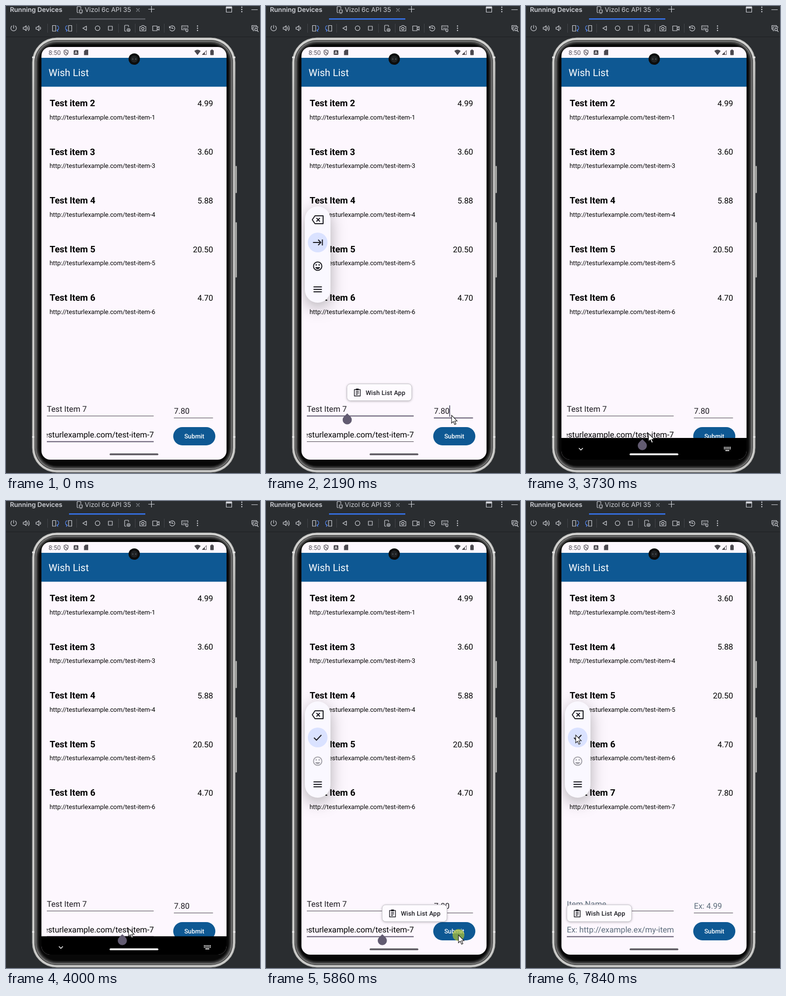
An HTML page that plays this animation: 516x946 px, repeating every 8 s.

```html
<!DOCTYPE html>
<html lang="en">
<head>
<meta charset="utf-8">
<title>Wish List</title>
<style>
  html, body { margin: 0; width: 100%; height: 100%; overflow: hidden; background: #2a2d30; }
  svg#stage { display: block; width: 100vw; height: 100vh; }
  text { font-family: Roboto, "Open Sans", sans-serif; fill: #000; text-rendering: geometricPrecision; white-space: pre; }
  .ide { font-family: Inter, Roboto, sans-serif; font-size: 13.15px; fill: #ced0d6; }
  .name { font-size: 18.3px; font-weight: 700; }
  .price { font-size: 16.3px; text-anchor: end; }
  .link { font-size: 12.8px; }
  .input { font-size: 16.3px; fill: #1d1b20; }
  .hint { font-size: 16.3px; fill: #5c6c7b; }
  .label { font-size: 12.8px; font-weight: 500; }
  .line { fill: none; stroke: #ced0d6; stroke-width: 1.2; stroke-linecap: round; stroke-linejoin: round; }
  .dark { fill: none; stroke: #1b1b21; stroke-width: 2; stroke-linejoin: round; }
  #keys { filter: drop-shadow(0 9px 16px rgba(0, 0, 0, .3)); }
  #chip { filter: drop-shadow(0 1px 2px rgba(0, 0, 0, .25)); }
</style>
</head>
<body>
<svg id="stage" viewBox="0 0 516 946" preserveAspectRatio="none">
  <defs>
    <linearGradient id="metal" x1="0" y1="0" x2="0" y2="1">
      <stop offset="0" stop-color="#d4d4d2"/>
      <stop offset=".12" stop-color="#bdbdbb"/>
      <stop offset=".6" stop-color="#c6c6c4"/>
      <stop offset="1" stop-color="#cacac8"/>
    </linearGradient>
    <clipPath id="screen"><rect x="72" y="83" width="376" height="836" rx="18"/></clipPath>
    <clipPath id="listBox"><rect x="72" y="176" width="376" height="466"/></clipPath>
    <clipPath id="urlBox"><rect x="83" y="850" width="217.500" height="32"/></clipPath>
  </defs>

  <rect width="516" height="946" fill="#2a2d30"/>
  <rect y="62" width="516" height="1" fill="#1e1f22"/>

  <!-- tool window header -->
  <text class="ide" x="8" y="12" font-weight="600">Running Devices</text>
  <text class="ide" x="160" y="12">Vizol 6c API 35</text>
  <rect id="tab" x="128" y="25" width="155" height="2.600"/>
  <g class="line">
    <path d="M152 6V2.500Q152 1 150.500 1H146Q144.500 1 144.500 2.500V12Q144.500 13.500 146 13.500H147M149 8H155V13H149ZM150 15H154"/>
    <path d="M265 5L271 11M271 5L265 11" stroke="#868a91"/>
    <path d="M289.500 6.500H301.500M295.500 .5V12.500M499 7.500H511"/>
    <rect x="447.500" y="1.500" width="11" height="11"/><path d="M448 3.500H458" stroke-width="3"/>
  </g>
  <g id="dots" fill="#ced0d6"></g>

  <!-- device toolbar -->
  <path d="M84.500 36V54M143.500 36V54M228.500 36V54M262.500 36V54M321.500 36V54" stroke="#43454a"/>
  <g class="line">
    <path d="M15.500 39V45M12 40.500A5.600 5.600 0 1 0 19 40.500"/>
    <path d="M35 43H37.500L41 40V50L37.500 47H35ZM43.500 42.500Q45.500 45 43.500 47.500M45.500 40Q49.500 45 45.500 50"/>
    <path d="M61 43H63.500L67 40V50L63.500 47H61ZM69.500 42.500Q71.500 45 69.500 47.500"/>
    <path d="M94.500 39.500H101V51H94.500Z"/>
    <path d="M103.500 40Q107.500 40.500 107 45Q107 48.500 103.500 49.500M105.500 47.500L103.500 49.500L105.500 51.500" stroke="#548af7"/>
    <path d="M127 39.500H133.500V51H127Z"/>
    <path d="M124.500 40Q120.500 40.500 121 45Q121 48.500 124.500 49.500M122.500 47.500L124.500 49.500L122.500 51.500" stroke="#548af7"/>
    <path d="M156 45L163.500 40.800V49.200Z"/>
    <circle cx="186" cy="45" r="4.700"/>
    <rect x="208" y="41" width="8" height="8"/>
    <path d="M249 42V40Q249 39 248 39H242Q241 39 241 40V50Q241 51 242 51H244"/>
    <circle cx="249" cy="48.500" r="3"/><circle cx="249" cy="48.500" r=".7"/>
    <path d="M272 41.500H275L276.500 39.500H280L281.500 41.500H284V50.500H272Z"/><circle cx="278" cy="45.800" r="2.500"/>
    <path d="M298 40.500H307V50H298ZM307 44L311 41.500V49L307 46.500"/>
    <path d="M332 41V44.500H335.500M332.500 44A5.300 5.300 0 1 1 333 48M337.500 42.500V45.500H340"/>
    <path d="M366 48H357V40H369.500V44M359.500 42.500H360M362.500 42.500H363M365.500 42.500H366M360 45.500H365"/>
    <rect x="365.500" y="46" width="4" height="6" rx="2"/>
    <path d="M502 47H499.500V39.500H509V42M504 50H502V42H511.500V44"/><circle cx="508" cy="47.500" r="2.700"/><path d="M510 49.500L512.500 52"/>
  </g>

  <!-- phone body -->
  <g fill="#c2c2be" stroke="#55585a" stroke-width=".7">
    <rect x="464" y="324" width="5" height="55" rx="1"/>
    <rect x="464" y="438" width="5" height="112" rx="1"/>
  </g>
  <rect x="53" y="64" width="413" height="881" rx="50" fill="url(#metal)" stroke="#5c5e5e" stroke-width="1"/>
  <path d="M53 104H59M460 104H466M53 873H59M460 873H466" stroke="#e6e6e6" stroke-width="3"/>
  <g id="bezel"></g>

  <g clip-path="url(#screen)">
    <rect x="72" y="83" width="376" height="836" fill="#fdf7fe"/>
    <g id="list" clip-path="url(#listBox)"><g id="rows"></g></g>
    <rect x="72" y="105" width="376" height="58.500" fill="#0e5893"/>
    <text x="86.500" y="142.400" font-size="20.100" style="fill:#fff">Wish List</text>

    <!-- status bar -->
    <text x="86.500" y="98.500" font-size="12.800" style="fill:#55525a">8:50</text>
    <g fill="#4b484f">
      <path d="M122 89L126 90.500V94Q126 97.500 122 99.500Q118 97.500 118 94V90.500Z" fill="none" stroke="#4b484f" stroke-width="1.300"/>
      <path d="M120 92L124.500 97" stroke="#4b484f" stroke-width="1.200"/>
      <rect x="137.500" y="89.500" width="9.500" height="9.500" rx="1.500"/>
      <path d="M140 97L142.200 91.500L144.500 97M141 95.300H143.500" stroke="#fff" fill="none"/>
      <path d="M161.500 88.500H167V99.500H158.500V91.500Z"/>
      <path d="M382.500 91Q389 86 395.500 91L389 99.500Z"/>
      <path d="M398.500 99V98L407.500 89.500V99ZM404 93.500V98H406.500V91.500Z" fill-rule="evenodd"/>
      <rect x="415" y="89.500" width="7" height="10" rx="1"/><rect x="417" y="88.300" width="3" height="2"/>
    </g>
    <circle cx="260.500" cy="107.500" r="11.500" fill="#0c0c0c"/>
    <circle cx="260.500" cy="107.500" r="7" fill="#202224"/>
    <path d="M256.500 107.500H258.500M262.500 107.500H264.500" stroke="#59606a" stroke-width="2"/>

    <!-- form -->
    <g id="filled">
      <text class="input" x="83" y="821.800">Test Item 7</text>
      <text class="input" x="341.200" y="826.300">7.80</text>
      <g clip-path="url(#urlBox)"><text class="input" x="300.300" y="874" text-anchor="end" style="fill:#000">http://testurlexample.com/test-item-7</text></g>
    </g>
    <g id="empty">
      <text class="hint" x="83" y="821.800">Item Name</text>
      <text class="hint" x="341.200" y="826.300">Ex: 4.99</text>
      <g clip-path="url(#urlBox)"><text class="hint" x="83" y="874">Ex: http://example.ex/my-item</text></g>
    </g>
    <path id="nameLine" d="M83 830.500H300"/>
    <path id="priceLine" d="M341 834.500H420.500"/>
    <path id="urlLine" d="M83 882.500H300"/>
    <rect id="button" x="339.700" y="853" width="85.600" height="37" rx="18.500"/>
    <text class="label" x="382.500" y="876.300" text-anchor="middle" style="fill:#fff">Submit</text>
    <rect id="caret" width="1.500" height="23" fill="#42405a"/>

    <!-- collapsed keyboard bar -->
    <g id="bar">
      <rect x="72" y="875" width="376" height="80"/>
      <path d="M107.500 895.500L111.500 899.500L115.500 895.500" fill="none" stroke="#fff" stroke-width="1.500"/>
      <path d="M402 894H416M402 897H416" stroke="#eee" stroke-width="1.800" stroke-dasharray="2 1"/>
      <path d="M405 900.500H413" stroke="#eee" stroke-width="1.800"/>
    </g>
    <rect id="pill" x="210.500" y="906.300" width="99" height="3.800" rx="1.900"/>
    <path id="drop" d="M0 -13L6.600 -6.600A9.300 9.300 0 1 1 -6.600 -6.600Z" fill="#625b71"/>

    <!-- clipboard chip -->
    <g id="chip">
      <rect x=".5" y=".5" width="131.500" height="34" rx="7" fill="#fefbff" stroke="#c6c4ca"/>
      <path class="dark" style="stroke-width:1.400" d="M15.500 12H27.500V25H15.500ZM18.500 16H24.500M18.500 19H24.500M18.500 22H22.500"/>
      <rect x="18.500" y="10" width="6" height="3.500" rx="1" fill="#1b1b21"/>
      <text class="label" x="38.400" y="22.500" letter-spacing=".18" style="fill:#1b1b21">Wish List App</text>
    </g>

    <!-- floating key strip, centred on its own middle -->
    <g id="keys">
      <rect x="-26" y="-97.500" width="52" height="195" rx="26" fill="#faf8ff"/>
      <circle cy="-24.500" r="20" fill="#dae2ff"/>
      <path class="dark" d="M-11 -70.500L-5.500 -78.500H11V-62.500H-5.500ZM-2.500 -74L4.500 -67M4.500 -74L-2.500 -67"/>
      <path id="next" class="dark" d="M-9.500 -24.500H6M1 -30L6.500 -24.500L1 -19M9.500 -30.500V-18.500"/>
      <path id="check" class="dark" d="M-7.500 -24L-2.500 -19L7.500 -29.500"/>
      <g id="face">
        <circle class="dark" cy="23.500" r="8.500"/>
        <circle cx="-3" cy="21" r="1.400" fill="#1b1b21"/><circle cx="3" cy="21" r="1.400" fill="#1b1b21"/>
        <path d="M-5 25.500H5Q3.500 29.500 0 29.500T-5 25.500Z" fill="#1b1b21"/>
      </g>
      <path class="dark" d="M-8.500 65.500H8.500M-8.500 70.500H8.500M-8.500 75.500H8.500"/>
    </g>
  </g>

  <g id="mouse">
    <circle id="press" r="12" fill="#bccb2c" fill-opacity=".65"/>
    <path d="M0 0V16L3.700 12.700L6.300 18.800L9 17.700L6.400 11.700H11.300Z" fill="#fff" stroke="#111" stroke-width="1.100"/>
  </g>
</svg>

<script>
const LOOP = 8000, PITCH = 98.6;
const el = id => document.getElementById(id);
const ui = {};
document.querySelectorAll('[id]').forEach(n => ui[n.id] = n);

el('dots').innerHTML = [[479, 7], [389, 45]].map(([x, y]) =>
  [-4.5, 0, 4.5].map(d => `<circle cx="${x}" cy="${y + d}" r="1.25"/>`).join('')).join('');

// glossy rim: a dark seam, then nested outlines fading from grey to black
const inset = (d, shade) => `<rect x="${53 + d}" y="${64 + d}" width="${413 - 2 * d}"
  height="${881 - 2 * d}" rx="${50 - d}" fill="rgb(${shade},${shade},${shade})"/>`;
let rim = inset(5, 28);
for (let i = 0; i <= 12; i++) rim += inset(6 + i * .75, Math.round(8 + 122 * (1 - i / 12) ** 1.5));
el('bezel').innerHTML = rim;

const items = [
  ['item 2', '4.99', 1], ['item 3', '3.60', 3], ['Item 4', '5.88', 4],
  ['Item 5', '20.50', 5], ['Item 6', '4.70', 6], ['Item 7', '7.80', 7]
];
el('rows').innerHTML = items.map(([name, price, n], i) => `<g transform="translate(0 ${i * PITCH})">
  <text class="name" x="88.700" y="203">Test ${name}</text>
  <text class="price" x="420.700" y="202.800">${price}</text>
  <text class="link" x="88.500" y="229.600">http://testurlexample.com/test-item-${n}</text></g>`).join('');

// pointer path: time, x, y
const path = [
  [290, 444, 890], [620, 335, 858], [1030, 214, 808], [1100, 214, 808], [1240, 206, 815],
  [1380, 206, 815], [1850, 347, 821], [1920, 347, 821], [2080, 377, 829], [2850, 377, 829],
  [3260, 335, 850], [3400, 335, 850], [3570, 249, 866], [4270, 249, 866], [4490, 166, 883],
  [4790, 339, 884], [5010, 339, 884], [5730, 391, 879], [6680, 391, 879], [7420, 166, 530],
  [7500, 166, 530], [7800, 101, 474]
];
const presses = [[1230, 1350], [2080, 2180], [3580, 3700], [5860, 6000]];

const within = (t, a, b) => t >= a && t < b;
const ramp = (t, a, b) => Math.min(1, Math.max(0, (t - a) / (b - a)));
const ease = (t, a, b) => { const p = ramp(t, a, b); return p * p * (3 - 2 * p); };
const show = (n, on) => n.style.display = on ? '' : 'none';
const move = (n, x, y, s = 1) => n.setAttribute('transform', `translate(${x} ${y}) scale(${s})`);
const blink = (t, start) => (t - start) % 1000 < 500;

function pointerAt(t) {
  let i = 0;
  while (i < path.length - 2 && t >= path[i + 1][0]) i++;
  const [a, x, y] = path[i], [b, u, v] = path[i + 1], p = ease(t, a, b);
  return [x + (u - x) * p, y + (v - y) * p];
}

function underline(n, on) {
  n.setAttribute('stroke', on ? '#625b71' : '#4b474e');
  n.setAttribute('stroke-width', on ? 2 : 1);
}

function caretAt(t) {
  if (within(t, 1250, 2110)) return blink(t, 1250) && [164.5, 804];
  if (within(t, 2110, 3590)) return blink(t, 2110) && [372.5, 809];
  if (within(t, 4200, 6080)) return blink(t, 4200) && [235.7, 856];
  return t >= 6080 && blink(t, 6010) && [83, 856];
}

function draw(t) {
  ui.tab.setAttribute('fill', t < 1200 ? '#5a5d63' : '#3574f0');

  const done = t >= 6080;
  show(ui.filled, !done);
  show(ui.empty, done);
  move(ui.rows, 0, -PITCH * ease(t, 6060, 6240));
  underline(ui.nameLine, within(t, 1250, 2230));
  underline(ui.priceLine, within(t, 2110, 3600));
  underline(ui.urlLine, t < 1250 || t >= 3600);

  const lit = ramp(t, 5920, 6050) * (1 - ramp(t, 6560, 6800));
  ui.button.setAttribute('fill', `rgb(${14 + 13 * lit},${88 + 8 * lit},${147 + 7 * lit})`);

  const caret = caretAt(t);
  show(ui.caret, caret);
  if (caret) move(ui.caret, ...caret);

  const rise = ease(t, 2850, 3080) * (1 - ease(t, 3960, 4130));
  move(ui.bar, 0, 46 * (1 - rise));
  show(ui.bar, rise > 0);
  ui.pill.setAttribute('fill', rise > .5 ? '#fff' : '#625f65');

  const first = within(t, 1250, 2230);
  show(ui.drop, first || within(t, 3600, 6080));
  move(ui.drop, ...(first ? [165, 838.3] : [236.3, 890.5]));

  const chip = within(t, 1930, 2230) ? [164, 765] : within(t, 4150, 6080) ? [235.5, 817.5] : t >= 6150 && [82.5, 817.5];
  show(ui.chip, chip);
  if (chip) move(ui.chip, ...chip);

  const second = t >= 4150, open = second ? 4150 : 1930;
  const alpha = ramp(t, open, open + 130) * (second ? 1 : 1 - ramp(t, 2780, 2880));
  show(ui.keys, alpha > 0);
  ui.keys.style.opacity = alpha;
  move(ui.keys, second ? 112 - 7 * ease(t, 4480, 4720) : 105, 503.5, .85 + .15 * ease(t, open, open + 220));
  show(ui.next, !second);
  show(ui.check, second);
  ui.face.style.opacity = second ? .38 : 1;

  show(ui.mouse, t >= 290);
  move(ui.mouse, ...pointerAt(t));
  show(ui.press, presses.some(([a, b]) => within(t, a, b)));
}

const start = performance.now();
function tick() {
  draw((performance.now() - start) % LOOP);
  requestAnimationFrame(tick);
}
tick();
</script>
</body>
</html>
```
